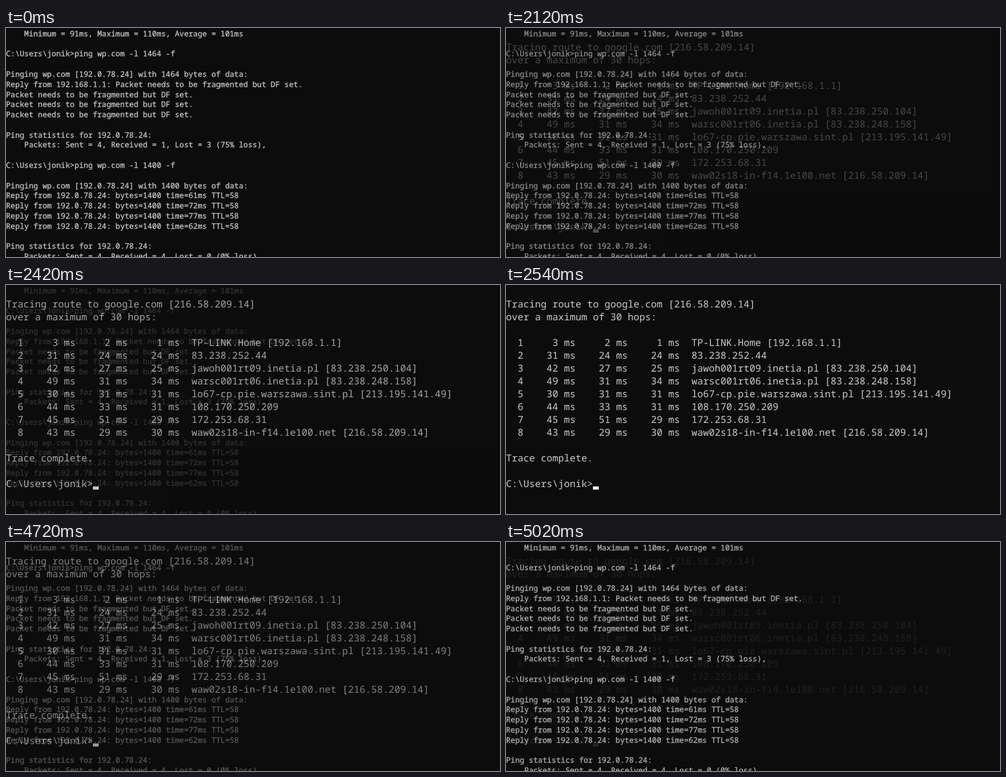
An HTML page for the animation above (5.08 s loop, 767 by 357 pixels).

```html
<!DOCTYPE html>
<html lang="en">
<head>
<meta charset="utf-8">
<title>Ping and trace</title>
<style>
  html, body { margin: 0; width: 100%; height: 100%; overflow: hidden; background: #0c0c0c; }
  svg { display: block; }
  text {
    font-family: "Noto Sans Mono", Consolas, "DejaVu Sans Mono", monospace;
    fill: #ccc; white-space: pre; text-rendering: geometricPrecision;
  }
  #ping text { stroke: #ccc; stroke-width: 0.25px; }
</style>
</head>
<body>
<svg width="767" height="357" viewBox="0 0 767 357">
  <g id="ping" font-size="11.82"></g>
  <g id="trace" font-size="15" opacity="0">
    <rect width="767" height="357" fill="#0c0c0c"/>
    <rect x="135" y="314" width="9" height="5" fill="#f2f2f2"/>
  </g>
</svg>
<script>
const prompt = 'C:\\Users\\jonik>';
const reply = ms => `Reply from 192.0.78.24: bytes=1400 time=${ms}ms TTL=58`;
const unsent = 'Packet needs to be fragmented but DF set.';

const pingLines = [
  '    Minimum = 91ms, Maximum = 110ms, Average = 101ms',
  '',
  prompt + 'ping wp.com -l 1464 -f',
  '',
  'Pinging wp.com [192.0.78.24] with 1464 bytes of data:',
  'Reply from 192.168.1.1: ' + unsent,
  unsent, unsent, unsent,
  '',
  'Ping statistics for 192.0.78.24:',
  '    Packets: Sent = 4, Received = 1, Lost = 3 (75% loss),',
  '',
  prompt + 'ping wp.com -l 1400 -f',
  '',
  'Pinging wp.com [192.0.78.24] with 1400 bytes of data:',
  ...[61, 72, 77, 62].map(reply),
  '',
  'Ping statistics for 192.0.78.24:',
  '    Packets: Sent = 4, Received = 4, Lost = 0 (0% loss),'
];

const hops = [
  [3, 2, 1, 'TP-LINK.Home [192.168.1.1]'],
  [31, 24, 24, '83.238.252.44'],
  [42, 27, 25, 'jawoh001rt09.inetia.pl [83.238.250.104]'],
  [49, 31, 34, 'warsc001rt06.inetia.pl [83.238.248.158]'],
  [30, 31, 31, 'lo67-cp.pie.warszawa.sint.pl [213.195.141.49]'],
  [44, 33, 31, '108.170.250.209'],
  [45, 51, 29, '172.253.68.31'],
  [43, 29, 30, 'waw02s18-in-f14.1e100.net [216.58.209.14]']
];
const hopLine = ([a, b, c, host], i) =>
  `  ${i + 1}` + [a, b, c].map(n => String(n).padStart(6) + ' ms').join('') + '  ' + host;

const traceLines = [
  'Tracing route to google.com [216.58.209.14]',
  'over a maximum of 30 hops:',
  '',
  ...hops.map(hopLine),
  '',
  'Trace complete.',
  '',
  prompt
];

function print(id, lines, baseline, step) {
  const group = document.getElementById(id);
  lines.forEach((line, i) => {
    const text = document.createElementNS('http://www.w3.org/2000/svg', 'text');
    text.setAttribute('y', baseline + i * step);
    text.textContent = line;
    group.append(text);
  });
  return group;
}

print('ping', pingLines, 12.9, 15.78);
const trace = print('trace', traceLines, 35, 20);

// Each half of the loop holds for 2 s, then fades in nine 60 ms steps.
const HOLD = 2000, STEP = 60, HALF = 2540;

function draw(now) {
  const t = now % (2 * HALF);
  const local = t % HALF;
  const fade = local < HOLD ? 0 : (Math.floor((local - HOLD) / STEP) + 1) / 10;
  trace.setAttribute('opacity', t < HALF ? fade : 1 - fade);
  requestAnimationFrame(draw);
}
draw(0);
</script>
</body>
</html>
```
